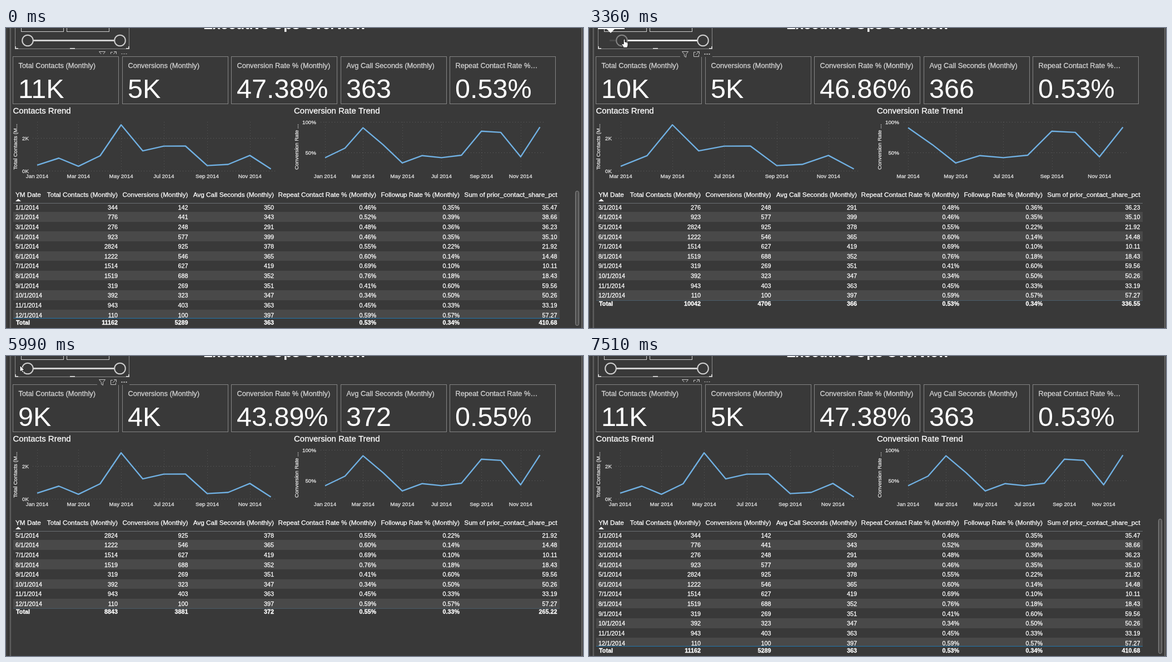
Recreate the animation shown at these times as an HTML page with a canvas. Size 1038 by 540 pixels, loop 8 s.

```html
<!DOCTYPE html>
<html lang="en">
<head>
<meta charset="utf-8">
<title>Executive Ops Overview</title>
<style>
html, body { margin: 0; width: 100%; height: 100%; overflow: hidden; background: #393939; }
canvas { display: block; }
</style>
</head>
<body>
<canvas id="stage" width="1038" height="540"></canvas>
<script>
const ctx = document.getElementById('stage').getContext('2d');
const LOOP = 8000;
const BG = '#393939', BLUE = '#70b0e2', SANS = '"Liberation Sans", Arial, sans-serif';
const MONTHS = 'Jan Feb Mar Apr May Jun Jul Aug Sep Oct Nov Dec'.split(' ');

// contacts, conversions, call seconds, repeat %, follow-up %, prior share
const DATA = [
  [344, 142, 350, .46, .35, 35.47], [776, 441, 343, .52, .39, 38.66],
  [276, 248, 291, .48, .36, 36.23], [923, 577, 399, .46, .35, 35.10],
  [2824, 925, 378, .55, .22, 21.92], [1222, 546, 365, .60, .14, 14.48],
  [1514, 627, 419, .69, .10, 10.11], [1519, 688, 352, .76, .18, 18.43],
  [319, 269, 351, .41, .60, 59.56], [392, 323, 347, .34, .50, 50.26],
  [943, 403, 363, .45, .33, 33.19], [110, 100, 397, .59, .57, 57.27]
];
// averages over the selected range, by first month
const AVERAGES = { 0: [363, .53, .34], 2: [366, .53, .34], 4: [372, .55, .33] };
const COLUMNS = [
  ['Total Contacts (Monthly)', 201], ['Conversions (Monthly)', 327.5], ['Avg Call Seconds (Monthly)', 482],
  ['Repeat Contact Rate % (Monthly)', 666], ['Followup Rate % (Monthly)', 816], ['Sum of prior_contact_share_pct', 991.5]
];

// timeline
const CURSOR = [[1440, 120, -14], [1860, 43, 20], [2410, 43, 20], [2690, 62, 20], [3890, 62, 20], [4300, 91, 17],
  [5190, 91, 17], [5530, 25, 17], [6530, 25, 17], [6880, 155, 280], [7230, 250, 545]];
const HANDLE = [[2410, 39], [2760, 55], [2900, 59], [3890, 59], [4300, 88], [5190, 88], [5530, 39]];
const CHART_FROM = [[0, 0], [2900, 2], [4440, 4], [5990, 0]];
const TABLE_FROM = [[0, 0], [2970, 2], [4510, 4], [6060, 0]];
const PRESSED = [[2410, 2830], [3890, 4400], [5190, 5755]];
const HAND = [[1860, 2410], [3360, 3890], [4650, 5190]];

const ARROW = new Path2D('M0 0V11.6L2.7 9.2L4.5 13.2L6.5 12.3L4.8 8.4H8.4Z');
const POINTER = new Path2D('M-1.4 .8Q0-1 1.4 .8V5L5 5.6Q6.6 6 6.6 8V10.5Q6.6 13 5 15.4H-1.4Q-2.4 12.5-4.8 9.4Q-4.4 7.4-1.4 9Z');

const during = (t, spans) => spans.some(([a, b]) => t >= a && t < b);
const held = (t, steps) => steps.filter(s => t >= s[0]).pop()[1];
function tween(t, keys, i = 1) {
  const next = keys.findIndex(k => k[0] > t);
  if (next < 0) return keys[keys.length - 1][i];
  if (next === 0) return keys[0][i];
  const a = keys[next - 1], b = keys[next];
  return a[i] + (b[i] - a[i]) * (t - a[0]) / (b[0] - a[0]);
}

function text(s, x, y, size, color = '#fff', align = 'left', weight = '') {
  ctx.font = `${weight} ${size}px ${SANS}`;
  ctx.fillStyle = color;
  ctx.textAlign = align;
  ctx.fillText(s, x, y);
  if (size < 16) {
    // small type is set slightly heavier
    ctx.strokeStyle = color;
    ctx.lineWidth = .3;
    ctx.strokeText(s, x, y);
  }
}
function rect(x, y, w, h, color) {
  ctx.fillStyle = color;
  ctx.fillRect(x, y, w, h);
}
function box(x, y, w, h, color) {
  ctx.strokeStyle = color;
  ctx.lineWidth = 1;
  ctx.strokeRect(x + .5, y + .5, w, h);
}
function line(points, color, width = 1) {
  ctx.strokeStyle = color;
  ctx.lineWidth = width;
  ctx.beginPath();
  points.forEach(([x, y]) => ctx.lineTo(x, y));
  ctx.stroke();
}
function disc(x, y, r, fill, stroke) {
  ctx.beginPath();
  ctx.arc(x, y, r, 0, 7);
  ctx.fillStyle = fill;
  ctx.fill();
  if (stroke) {
    ctx.strokeStyle = stroke;
    ctx.lineWidth = 2;
    ctx.stroke();
  }
}

// filter, focus and more icons of a visual's header
function headerIcons(x, y) {
  const c = '#c4c4c4';
  line([[x - 5.5, y - 4.5], [x + 5.5, y - 4.5], [x + 1.5, y + .5], [x + 1.5, y + 5.5], [x - 1.5, y + 4], [x - 1.5, y + .5], [x - 5.5, y - 4.5]], c);
  line([[x + 19, y - 3.5], [x + 15.5, y - 3.5], [x + 15.5, y + 4.5], [x + 24.5, y + 4.5], [x + 24.5, y + 1]], c);
  line([[x + 19, y + 1], [x + 24.5, y - 4]], c);
  line([[x + 21, y - 4.5], [x + 25.5, y - 4.5], [x + 25.5, y]], c);
  for (let i = 0; i < 3; i++) rect(x + 34.5 + i * 4, y - 1, 2, 2, c);
}

function drawPage() {
  rect(0, 0, 1038, 540, BG);
  const edge = ctx.createLinearGradient(0, 0, 10, 0);
  edge.addColorStop(0, '#414141');
  edge.addColorStop(.6, '#333');
  edge.addColorStop(.75, '#666');
  edge.addColorStop(1, BG);
  rect(0, 0, 10, 540, edge);
  rect(1035, 0, 2, 540, '#666');
  text('Executive Ops Overview', 355, 2, 25.2, '#fff', 'left', 'bold');
}

function drawSlicer(t) {
  const x = tween(t, HANDLE), active = t >= 1930 && t < 5755;
  box(16, -10, 205, 47, '#8a8a8a');
  for (const [left, width] of [[16, 6], [115, 9], [216, 6]]) rect(left, 36, width, 2, '#ccc');
  for (const left of [16, 220]) rect(left, 33, 2, 5, '#ccc');
  box(27, -10, 76, 16, '#d0d0d0');
  box(109, -10, 76, 16, '#d0d0d0');
  rect(37, 21, x - 37, 3, '#4a4a4a');
  rect(x, 21, 205 - x, 3, active ? '#e8e8e8' : '#cfcfcf');
  disc(x, 22.5, 9.8, active ? '#383838' : BG, active ? '#858585' : '#cfcfcf');
  disc(205, 22.5, 9.8, BG, '#cfcfcf');
  if (t >= 1930 && t < 5400) {
    rect(16, 0, 48, 2, '#fff');
    ctx.beginPath();
    ctx.moveTo(31, 1);
    ctx.lineTo(39, 9);
    ctx.lineTo(47, 1);
    ctx.fill();
  }
  ctx.save();
  ctx.beginPath();
  const open = t >= 1510 && t < 7440;
  ctx.rect(164, 38, 58, open ? 17 : 9);
  ctx.clip();
  if (open) rect(164, 39, 58, 13, BG);
  headerIcons(173, 47);
  ctx.restore();
}

function sums(from) {
  return DATA.slice(from).reduce((acc, row) => acc.map((v, i) => v + row[i]), [0, 0, 0, 0, 0, 0]);
}
const percent = v => v.toFixed(2) + '%';
const thousands = v => Math.round(v / 1000) + 'K';

function drawCards(from) {
  const [contacts, conversions] = sums(from), [seconds, repeat] = AVERAGES[from];
  [
    ['Total Contacts (Monthly)', thousands(contacts)],
    ['Conversions (Monthly)', thousands(conversions)],
    ['Conversion Rate % (Monthly)', percent(100 * conversions / contacts)],
    ['Avg Call Seconds (Monthly)', seconds],
    ['Repeat Contact Rate %…', percent(repeat)]
  ].forEach(([label, value], i) => {
    const x = Math.round(12.4 + i * 196.5);
    box(x, 51, 190, 85, '#858585');
    text(label, x + 10.5, 72, 12.85, '#d4d4d4');
    text(value, x + 10, 126, 48.5);
  });
}

const day = m => (Date.UTC(2014, m) - Date.UTC(2014, 0)) / 864e5;

function drawChart({ title, axis, x, labelX, left, right, start, end, ticks, valueY, from, focus }) {
  const monthX = m => start + (end - start) * (day(m) - day(from)) / (day(11) - day(from));
  text(title, x, 154, 15);
  ctx.save();
  ctx.translate(x + 7.5, 255);
  ctx.rotate(-Math.PI / 2);
  text(axis, 0, 0, 9.6, '#e4e4e4');
  ctx.restore();

  const every = from === 4 ? 1 : 2;
  ctx.setLineDash([1, 4]);
  for (const [, y] of ticks) line([[left, y], [right, y]], '#606060');
  for (let m = from; m < 12; m += every) {
    const gx = Math.round(monthX(m)) + .5;
    line([[gx, 169], [gx, 257]], '#585858');
  }
  ctx.setLineDash([]);
  for (const [label, y] of ticks) text(label, labelX, y + 3.5, 9.8, '#e4e4e4', 'right');
  for (let m = from; m < 12; m += every) text(MONTHS[m] + ' 2014', monthX(m), 270, 9.8, '#e4e4e4', 'center');

  const points = DATA.slice(from).map((row, i) => [monthX(from + i), valueY(row)]);
  if (focus !== null) {
    const near = points.reduce((a, b) => Math.abs(b[0] - focus) < Math.abs(a[0] - focus) ? b : a);
    const fx = Math.round(near[0]) + .5;
    line([[fx, 168], [fx, 258]], '#b4b4b4');
    disc(near[0], near[1], 3.5, BLUE);
    box(9, 141, 492, 138, '#d8d8d8');
    headerIcons(452, 150);
  }
  ctx.lineJoin = 'round';
  line(points, BLUE, 2.4);
  ctx.lineJoin = 'miter';
}

function drawCharts(from, focus) {
  drawChart({
    title: 'Contacts Rrend', axis: 'Total Contacts (M...', x: 12.5, labelX: 41, left: 48, right: 484,
    start: 56 + from / 2, end: 476.5, ticks: [['2K', 198.5], ['0K', 257.5]],
    valueY: row => 257 - row[0] * .0293, from, focus
  });
  drawChart({
    title: 'Conversion Rate Trend', axis: 'Conversion Rate ...', x: 518, labelX: 558, left: 566, right: 970,
    start: 574, end: 960.5, ticks: [['100%', 169.5], ['50%', 224.5]],
    valueY: row => 279.3 - 111 * row[1] / row[0], from, focus: null
  });
}

function drawRow(cells, y, size, weight) {
  const [contacts, conversions, seconds, repeat, followup, prior] = cells;
  [contacts, conversions, seconds, percent(repeat), percent(followup), prior.toFixed(2)]
    .forEach((s, i) => text(s, COLUMNS[i][1], y, size, '#fff', 'right', weight));
}

function drawTable(from) {
  const top = 313.3, pitch = 17.64, size = 10.8;
  const rowY = i => Math.round(top + i * pitch);
  const bottom = Math.min(rowY(12 - from), 522);
  text('YM Date', 17, 304, 11.8);
  COLUMNS.forEach(([label, x]) => text(label, x, 304, 11.8, '#fff', 'right'));
  ctx.beginPath();
  ctx.moveTo(17, 312);
  ctx.lineTo(22, 307.5);
  ctx.lineTo(27, 312);
  ctx.fill();

  ctx.save();
  ctx.beginPath();
  ctx.rect(0, top, 1038, bottom - top);
  ctx.clip();
  DATA.slice(from).forEach((row, i) => {
    const baseline = Math.round(top + i * pitch + 13.3);
    if (i % 2) rect(13, rowY(i), 983, rowY(i + 1) - rowY(i), '#494949');
    text(`${from + i + 1}/1/2014`, 17, baseline, size);
    drawRow(row, baseline, size);
  });
  ctx.restore();
  rect(13, 315, 983, 1, '#6a6f73');
  rect(13, bottom, 983, 1, from ? '#4a5c68' : '#2276ad');

  const total = sums(from), [seconds, repeat, followup] = AVERAGES[from];
  const y = from ? bottom + 10 : 534;
  text('Total', 18, y, size, '#fff', 'left', 'bold');
  drawRow([total[0], total[1], seconds, repeat, followup, total[5]], y, size, 'bold');

  if (!from) {
    ctx.beginPath();
    ctx.roundRect(1024.5, 293.5, 6, 242, 3);
    ctx.fillStyle = '#505050';
    ctx.fill();
    ctx.strokeStyle = '#8c8c8c';
    ctx.lineWidth = 1;
    ctx.stroke();
  }
}

function drawCursor(t) {
  if (t < 1440 || t >= 7230) return;
  const x = tween(t, CURSOR), y = tween(t, CURSOR, 2), hand = during(t, HAND);
  if (during(t, PRESSED)) disc(x, y, 8, 'rgba(200,190,30,.85)');
  ctx.save();
  ctx.translate(x + (hand ? 1.5 : 0), y);
  ctx.fillStyle = '#fff';
  ctx.strokeStyle = '#111';
  ctx.lineWidth = 1;
  ctx.fill(hand ? POINTER : ARROW);
  ctx.stroke(hand ? POINTER : ARROW);
  ctx.restore();
}

function draw(t) {
  const tableFrom = held(t, TABLE_FROM);
  // hover reacts a little after the pointer
  const hoverX = tween(t - 70, CURSOR), hoverY = tween(t - 70, CURSOR, 2);
  drawPage();
  drawCards(tableFrom);
  drawSlicer(t);
  drawCharts(held(t, CHART_FROM), hoverY > 141 && hoverY < 279 ? hoverX : null);
  drawTable(tableFrom);
  if (hoverY > 286 && t < 7370) box(9, 286, 1025, 253, '#d8d8d8');
  drawCursor(t);
}

function tick() {
  draw(performance.now() % LOOP);
  requestAnimationFrame(tick);
}
tick();
</script>
</body>
</html>
```
